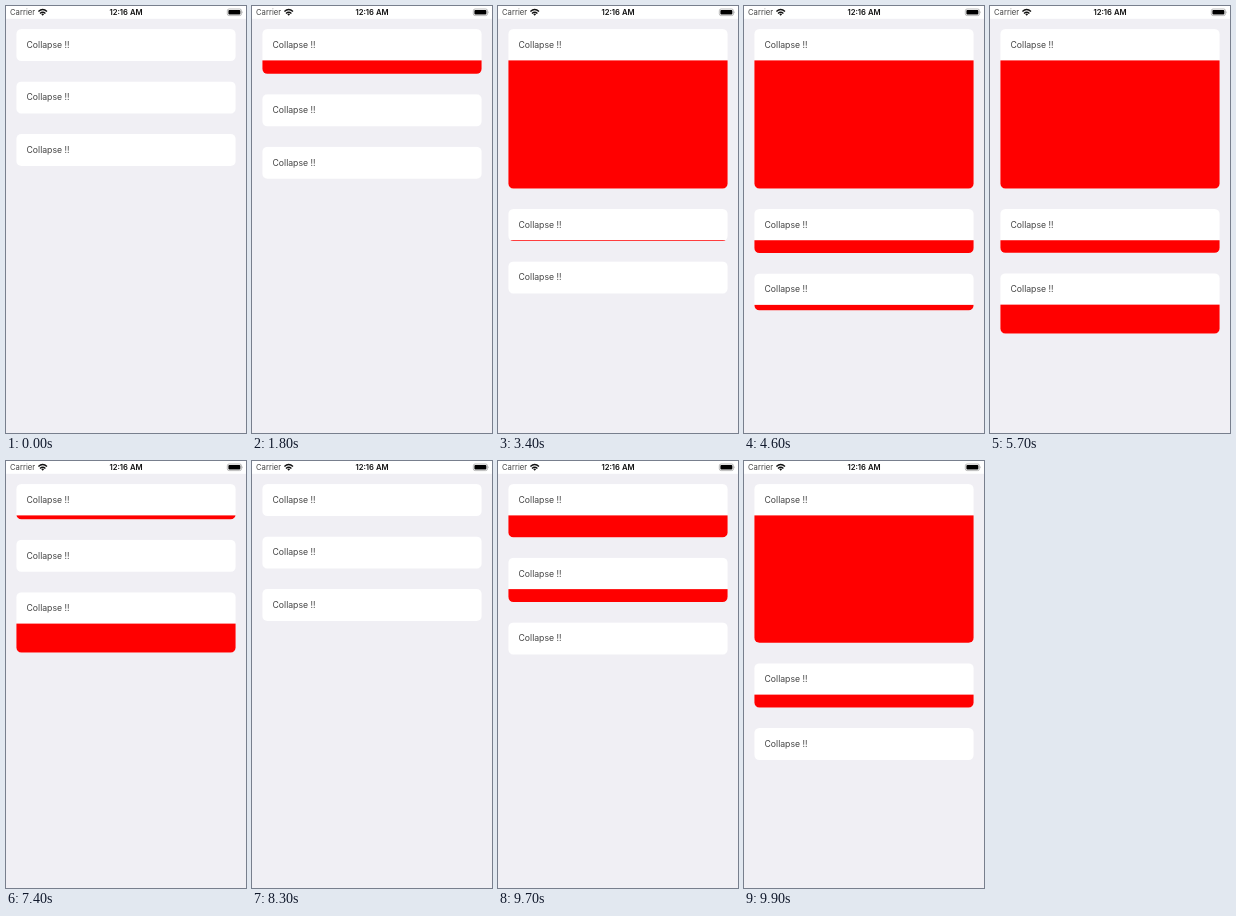
An HTML page for the animation above (10 s loop, 240x427 px).

```html
<!DOCTYPE html>
<html lang="en">
<head>
<meta charset="utf-8">
<title>Collapsible cards</title>
<style>
  html, body { margin: 0; width: 100%; height: 100%; overflow: hidden; background: #f0eff4; }
  svg { display: block; width: 100%; height: 100%; }
  text { font-family: Inter, "Liberation Sans", sans-serif; }
  .label { font-size: 8.7px; fill: #444; }
  .status { font-size: 7.68px; fill: #444; }
  .clock { font-weight: 600; fill: #111; text-anchor: middle; }
</style>
</head>
<body>
<svg id="stage" viewBox="0 0 240 427">
  <rect width="240" height="12.8" fill="#fff"/>
  <text class="status" x="4" y="9.3">Carrier</text>
  <g fill="none" stroke="#111" stroke-width="1.4">
    <path d="M32.4 5.6Q36.7 1.6 41 5.6M34 7.4Q36.7 4.9 39.4 7.4"/>
    <path d="M35.3 8.2Q36.7 7 38.1 8.2L36.7 9.7Z" fill="#111" stroke="none"/>
  </g>
  <text class="status clock" x="120" y="9.3">12:16 AM</text>
  <rect x="221.3" y="3" width="14.2" height="6.6" rx="1.8" fill="none" stroke="#999" stroke-width=".65"/>
  <rect x="222.4" y="4.1" width="12" height="4.4" rx=".9"/>
  <path d="M236.3 5.1Q237.5 6.3 236.3 7.5Z" fill="#999"/>
</svg>
<script>
const PT = 0.64, LOOP = 10000, STEP = 100, DURATION = 300;
const LEFT = 16 * PT, TOP = 36 * PT, WIDTH = 343 * PT, RADIUS = 8 * PT;
const HEADER = 49 * PT, GAP = 32 * PT;
const bodies = [200, 20, 45];   // open heights in points; a closed body keeps 1

// card index, start time, change in openness
const toggles = [
  [0, 1734, 1], [1, 3385, 1], [2, 4515, 1], [1, 5670, -1],
  [0, 7134, -1], [2, 7950, -1], [1, 8750, 1], [0, 9615, 1]
];

const stage = document.getElementById("stage");

function add(parent, name, attrs) {
  const node = document.createElementNS("http://www.w3.org/2000/svg", name);
  for (const key in attrs) node.setAttribute(key, attrs[key]);
  return parent.appendChild(node);
}

const cards = bodies.map((full, i) => {
  const group = add(stage, "g");
  const clip = add(add(group, "clipPath", { id: "card" + i }), "rect", { width: WIDTH, rx: RADIUS });
  const panel = add(group, "g", { "clip-path": `url(#card${i})` });
  add(panel, "rect", { width: WIDTH, height: 300, fill: "#fff" });
  const body = add(panel, "rect", { y: HEADER, width: WIDTH, height: 300, fill: "#f00" });
  add(group, "text", { class: "label", x: 16 * PT, y: 18.9 }).textContent = "Collapse !!";
  return { full, group, clip, body };
});

// cubic-bezier(.42, 0, .58, 1)
function easeInOut(x) {
  if (x <= 0) return 0;
  if (x >= 1) return 1;
  let lo = 0, hi = 1;
  for (let i = 0; i < 20; i++) {
    const s = (lo + hi) / 2, r = 1 - s;
    if (1.26 * s * r * r + 1.74 * s * s * r + s ** 3 < x) lo = s; else hi = s;
  }
  return lo * lo * (3 - 2 * lo);
}

function draw(now) {
  const t = Math.floor(now % LOOP / STEP) * STEP;
  const open = [0, 0, 0];
  for (const [i, start, change] of toggles) open[i] += change * easeInOut((t - start) / DURATION);

  let y = TOP;
  cards.forEach((card, i) => {
    const height = HEADER + PT * (1 + (card.full - 1) * open[i]);
    card.group.setAttribute("transform", `translate(${LEFT} ${y})`);
    card.clip.setAttribute("height", height);
    card.body.setAttribute("visibility", open[i] > 0 ? "visible" : "hidden");
    y += height + GAP;
  });
}

const origin = performance.now();
function tick() {
  draw(performance.now() - origin);
  requestAnimationFrame(tick);
}
tick();
</script>
</body>
</html>
```
